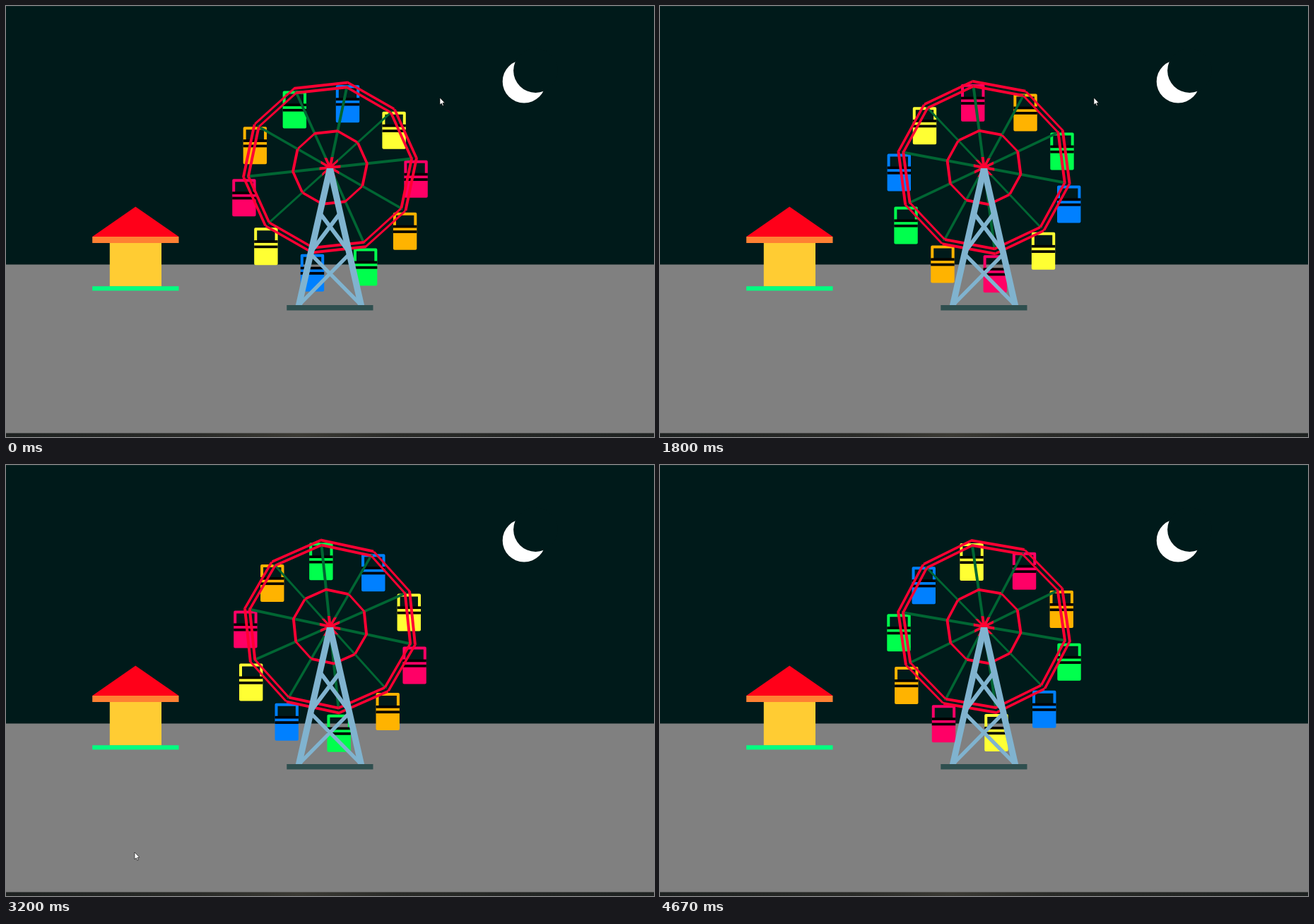
Recreate the animation shown at these times as an HTML page with a canvas. Size 917 px wide and 611 px high, loop 4740 ms.

```html
<!DOCTYPE html>
<html lang="en">
<head>
<meta charset="utf-8">
<title>Ferris wheel</title>
<style>
  html, body { margin: 0; width: 100%; height: 100%; overflow: hidden; background: #001a1a; }
  canvas { display: block; }
</style>
</head>
<body>
<canvas id="stage" width="917" height="611"></canvas>
<script>
const ctx = document.getElementById('stage').getContext('2d');
const LOOP = 4740, CX = 458.5, CY = 229, TURN = Math.PI * 2, COUNT = 10;
const SKY = '#001a1a', RED = '#ff0033', STEEL = '#80b3cf';
const CABINS = ['#ff0066', '#ffb300', '#00ff4d', '#0080ff', '#ffff33'];

// [tick, degrees] and [tick, x, y]; three ticks last 200 ms
const SPIN = [[0, -6.2], [11, -43.7], [27, -97.4], [42, -149.25], [54, -186.6], [63, -216.9], [70, -242.2]];
const POINTER = [[0, 614, 130], [37, 614, 130], [42, 362, 292], [48, 182, 549], [50, 104, 606]];

function along(keys, tick) {
  let i = 1;
  while (i < keys.length - 1 && keys[i][0] < tick) i++;
  const a = keys[i - 1], b = keys[i], p = (tick - a[0]) / (b[0] - a[0]);
  return a.slice(1).map((v, n) => v + (b[n + 1] - v) * p);
}

function rect(x, y, w, h, color) {
  ctx.fillStyle = color;
  ctx.fillRect(x, y, w, h);
}

function poly(points, color) {
  ctx.beginPath();
  points.forEach(p => ctx.lineTo(p[0], p[1]));
  ctx.closePath();
  ctx.fillStyle = color;
  ctx.fill();
}

function disc(x, y, r, color) {
  ctx.beginPath();
  ctx.arc(x, y, r, 0, TURN);
  ctx.fillStyle = color;
  ctx.fill();
}

// Line whose width is measured along the minor axis
function line(x1, y1, x2, y2, w, color) {
  const flat = Math.abs(x2 - x1) > Math.abs(y2 - y1);
  const ox = flat ? 0 : w / 2, oy = flat ? w / 2 : 0;
  poly([[x1 - ox, y1 - oy], [x2 - ox, y2 - oy], [x2 + ox, y2 + oy], [x1 + ox, y1 + oy]], color);
}

function rim(r, i, turn) {
  const a = turn + i * TURN / COUNT;
  return [CX + r * Math.cos(a), CY + r * Math.sin(a)];
}

function ring(r, turn) {
  for (let i = 0; i < COUNT; i++) line(...rim(r, i, turn), ...rim(r, i + 1, turn), 4, RED);
}

function spokes(r, turn, w, color) {
  for (let i = 0; i < COUNT; i++) line(CX, CY, ...rim(r, i, turn), w, color);
}

function cabin(x, y, color) {
  ctx.strokeStyle = color;
  ctx.lineWidth = 4;
  ctx.lineJoin = 'round';
  ctx.strokeRect(x - 14.7, y + 2, 29.4, 49);
  rect(x - 14.7, y + 20, 29.4, 31, color);
  rect(x - 16.7, y + 18, 33.4, 3.7, '#000');
  rect(x - 16.7, y + 25.4, 33.4, 3.7, '#000');
}

function backdrop(tick) {
  rect(0, 0, 917, 611, SKY);
  rect(0, 0, 917, 1, '#0c2626');
  rect(0, 366.5, 917, 240, '#808080');
  const bar = ctx.createLinearGradient(0, 0, 917, 0);
  bar.addColorStop(0, '#1e2221');
  bar.addColorStop(0.3, '#2a2b28');
  bar.addColorStop(0.45, '#3b3a34');
  bar.addColorStop(0.6, '#2a2b28');
  bar.addColorStop(1, '#1e2221');
  rect(0, 605.5, 917, 6, bar);
  if (tick >= 50 && tick < 56) rect(85.5, 605.5, 37.5, 6, '#414644');
  disc(733.2, 107, 30.5, '#fff');
  disc(749.5, 91.6, 31.4, SKY);
}

function house() {
  poly([[183.3, 284.5], [244.5, 327], [122.2, 327]], '#ff0019');
  rect(122.2, 327, 122.3, 9, '#ff8033');
  rect(146.8, 336, 73.2, 61.5, '#ffcc33');
  rect(122.2, 397.3, 122.3, 6.2, '#00ff80');
}

function wheel(turn) {
  for (let i = 0; i < COUNT; i++) {
    const [x, y] = rim(122.3, i, turn);
    cabin(x, y + 3, CABINS[i % 5]);
  }
  spokes(118, turn, 4, '#006633');
  ring(123.2, turn);
  ring(116.2, turn);
  ring(52.8, turn);
  spokes(15, turn, 4, RED);
}

function tower() {
  for (const s of [-1, 1]) {
    const brace = (x1, y1, x2, y2, w) => line(CX + s * x1, y1, CX + s * x2, y2, w, STEEL);
    brace(0, 230, 44, 424, 9.2);
    brace(-14, 294, 28, 350, 7.2);
    brace(-28, 351, 44, 424, 7.4);
  }
  rect(397.3, 424, 122.2, 7.5, '#2f4f4f');
}

function pointer(tick) {
  if (tick > 50) return;
  const [x, y] = along(POINTER, tick);
  const shape = [[0, 0], [0, 10], [2.3, 8], [3.8, 11.6], [5.3, 11], [3.9, 7.5], [6.8, 7.2]];
  poly(shape.map(p => [x + p[0], y + p[1]]), '#fff');
  ctx.strokeStyle = '#000';
  ctx.lineWidth = 0.6;
  ctx.stroke();
}

function draw() {
  const t = performance.now() % LOOP, rest = t % 200;
  const tick = 3 * Math.floor(t / 200) + (rest >= 70) + (rest >= 130);
  backdrop(tick);
  house();
  wheel(along(SPIN, tick)[0] * Math.PI / 180);
  tower();
  pointer(tick);
  requestAnimationFrame(draw);
}
draw();
</script>
</body>
</html>
```
